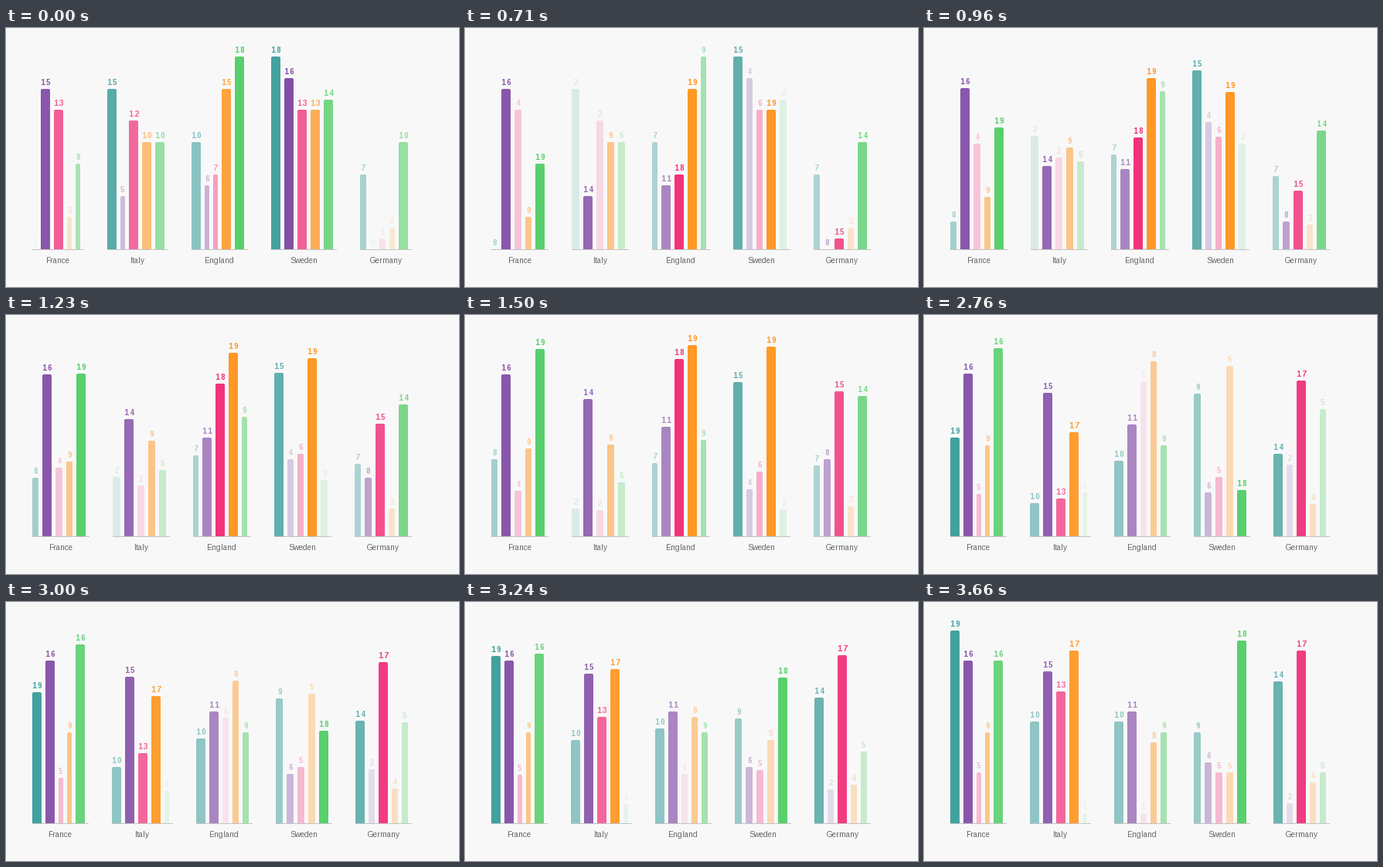
A matplotlib script that plays this animation: 586x336 px, repeating every 3.94 s.

```python
import math

import matplotlib.pyplot as plt
from matplotlib.animation import FuncAnimation
from matplotlib.patches import PathPatch, Rectangle
from matplotlib.path import Path

# Whole-pixel glyph advances, no kerning
plt.rcParams.update({
    "font.family": "Liberation Sans",
    "text.hinting": "force_autohint",
    "text.hinting_factor": 1,
    "text.kerning_factor": 6,
})

W, H, DPI = 586, 336, 64
LOOP, TICK = 3940, 10
LEFT, RIGHT, BASE, PLOT_H = 34, 525, 287, 250
GROUP_GAP, BAR_GAP, DIGIT_W, RADIUS = 30, 5, 6, 2
FONT = 10 * 72 / DPI
EASE_MS = 1263
COLORS = ["#43A19E", "#7B43A1", "#F2317A", "#FF9824", "#58CF6C"]

# The values printed above the bars: three rounds per country
SCORES = {
    "France": ([0, 15, 13, 3, 8], [8, 16, 4, 9, 19], [19, 16, 5, 9, 16]),
    "Italy": ([15, 5, 12, 10, 10], [2, 14, 2, 9, 5], [10, 15, 13, 17, 1]),
    "England": ([10, 6, 7, 15, 18], [7, 11, 18, 19, 9], [10, 11, 1, 8, 9]),
    "Sweden": ([18, 16, 13, 13, 14], [15, 4, 6, 19, 2], [9, 6, 5, 5, 18]),
    "Germany": ([7, 0, 1, 2, 10], [7, 8, 15, 3, 14], [14, 2, 17, 4, 5]),
}


def snap(v):
    return math.floor(v + 0.5 + 1e-6)


def ease(t):
    t = min(max(t, 0), 1)
    return 2 * t * t if t < 0.5 else 1 - 2 * (1 - t) ** 2


def moves(first, steady):
    """Eight moves 120 ms apart; past the steady ones every other lags 30."""
    return [first + 120 * k + 30 * max(0, (k - steady) // 2)
            for k in range(8)]


def share(total, mins):
    """Split total evenly, letting items with a larger minimum keep it."""
    fixed = set()
    while True:
        free = len(mins) - len(fixed)
        each = (total - sum(mins[i] for i in fixed)) / max(free, 1)
        over = {i for i, m in enumerate(mins) if i not in fixed and m > each}
        if not over:
            return [m if i in fixed else each for i, m in enumerate(mins)]
        fixed |= over


def bar_path(x0, x1, y):
    r = min(RADIUS, BASE - y)
    k = 0.45 * r
    pts = [(x0, BASE), (x0, y + r), (x0, y + k), (x0 + k, y), (x0 + r, y),
           (x1 - r, y), (x1 - k, y), (x1, y + k), (x1, y + r), (x1, BASE),
           (x0, BASE)]
    M, L, C, Z = Path.MOVETO, Path.LINETO, Path.CURVE4, Path.CLOSEPOLY
    return Path(pts, [M, L, C, C, C, L, C, C, C, L, Z])


class Round:
    """One set of values with its group spans, bar slots and heights."""

    def __init__(self, groups):
        self.values = [v for g in groups for v in g]
        self.top = max(self.values)
        self.heights = [PLOT_H * v / self.top for v in self.values]
        self.spans, self.slots = [], []
        mins = [[DIGIT_W * len(str(v)) for v in g] for g in groups]
        pad = BAR_GAP * len(COLORS)
        room = RIGHT - LEFT - GROUP_GAP * (len(groups) - 1)
        x = LEFT
        for width, m in zip(share(room, [sum(m) + pad for m in mins]), mins):
            self.spans.append((x, width))
            bx = x
            for w in share(width - pad, m):
                self.slots.append((bx, w))
                bx += w + BAR_GAP
            x += width + GROUP_GAP


ROUNDS = [Round(groups) for groups in zip(*SCORES.values())]
# Time of each switch, onset of its ease, moments the bars move
SWITCHES = [(710, 440, moves(840, 0)), (2760, 2403, moves(2760, 3))]

fig = plt.figure(figsize=(W / DPI, H / DPI), dpi=DPI, facecolor="#f8f8f8")
ax = fig.add_axes([0, 0, 1, 1])
ax.set(xlim=(0, W), ylim=(H, 0))
ax.axis("off")

bars, values, lines, labels = [], [], [], []
for name in SCORES:
    for color in COLORS:
        bars.append(ax.add_patch(
            PathPatch(bar_path(0, 6, BASE), fc=color, lw=0)))
        values.append(ax.text(0, 0, "", color=color, size=FONT,
                              weight="bold"))
    lines.append(ax.add_patch(
        Rectangle((0, BASE), 1, 1, fc="#c2c2c2", lw=0)))
    labels.append(ax.text(0, 305, name, color="#666666", size=FONT,
                          ha="center"))


def state(ms):
    """Round on show and how far its bars have moved."""
    stage, p = 0, 1
    for i, (start, onset, times) in enumerate(SWITCHES, 1):
        if ms >= start:
            past = [t for t in times if t <= ms]
            stage = i
            p = ease((past[-1] - onset) / EASE_MS) if past else 0
    return stage, p


def draw(n):
    stage, p = state(n * TICK)
    old, new = ROUNDS[max(stage - 1, 0)], ROUNDS[stage]
    for i, (v, (x, w)) in enumerate(zip(new.values, new.slots)):
        h0, h1 = old.heights[i], new.heights[i]
        y = snap(BASE - h0 - (h1 - h0) * p)
        alpha = min(1, v / new.top + 0.05)
        bars[i].set_path(bar_path(snap(x), snap(x + w), y))
        bars[i].set_alpha(alpha)
        values[i].set_text(str(v))
        values[i].set_alpha(alpha)
        values[i].set_position(
            (snap(x + (w - DIGIT_W * len(str(v))) / 2), y - 5))
    for line, label, (x, w) in zip(lines, labels, new.spans):
        line.set_x(snap(x))
        line.set_width(snap(x + w) - snap(x))
        label.set_x(x + w / 2)
    return bars + values + lines + labels


anim = FuncAnimation(fig, draw, frames=LOOP // TICK, interval=TICK,
                     repeat=True, repeat_delay=0, blit=False)
plt.show()
```
